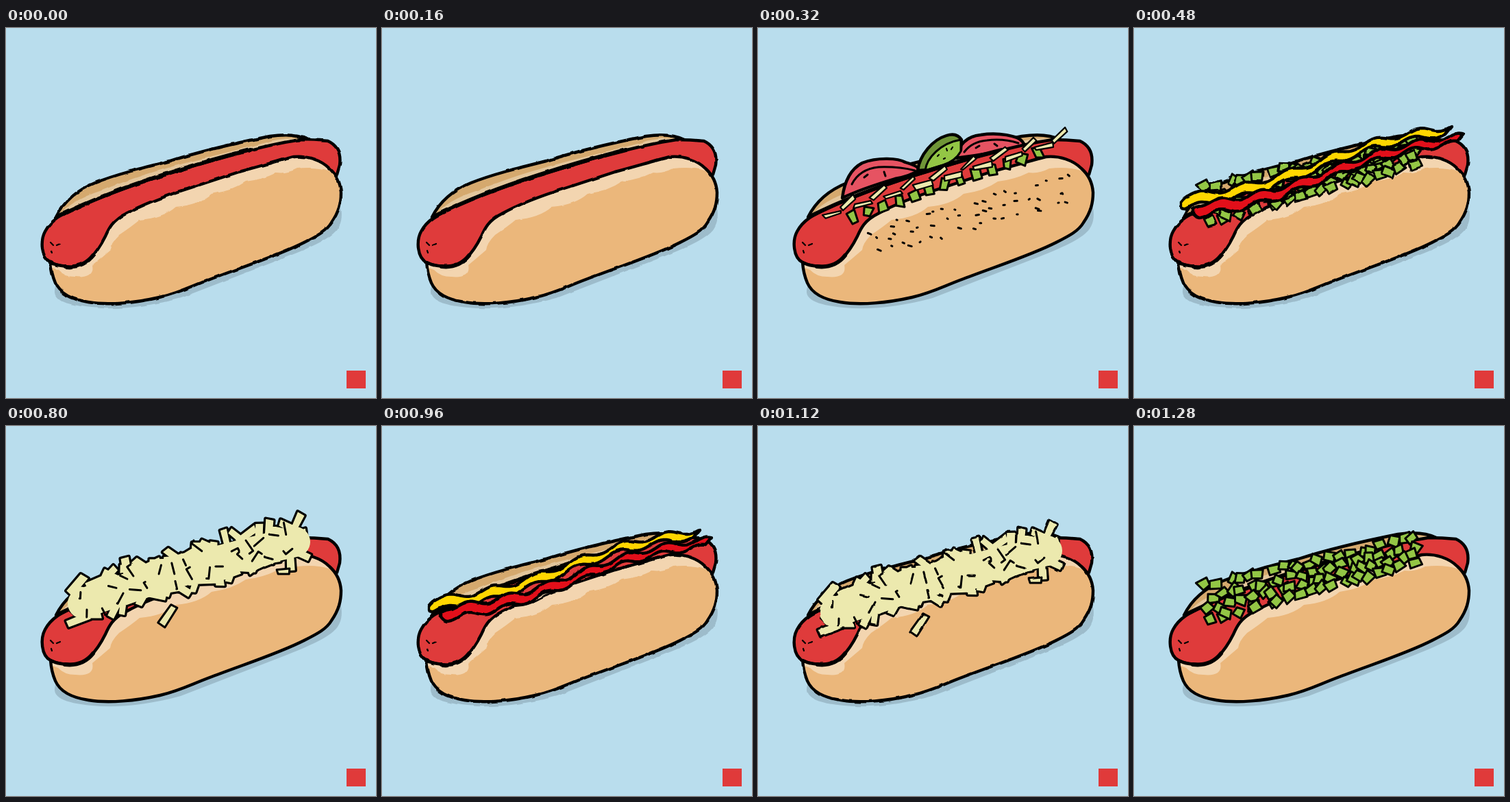
Animation, 540 px wide and 540 px high, one loop 1.44 s. Source, as an HTML page:

```html
<!DOCTYPE html>
<html lang="en">
<head>
<meta charset="utf-8">
<title>Hot dog toppings</title>
<style>
html, body { margin: 0; width: 100%; height: 100%; overflow: hidden; background: #b9dded; }
svg { display: block; width: 100vw; height: 100vh; }
.ink { stroke: #000; stroke-width: 4.4; stroke-linejoin: round; stroke-linecap: round; }
.thin { stroke-width: 3; }
.fine { stroke-width: 2.2; }
.thick { stroke-width: 6; }
.line { fill: none; }
#dog { animation: boil 480ms step-end infinite; }
.on { visibility: hidden; animation: show 1440ms step-end infinite; animation-delay: calc(var(--i) * 160ms - 1440ms); }
@keyframes boil {
  0% { filter: url(#wobble0); }
  33.3333% { filter: url(#wobble1); }
  66.6667%, 100% { filter: none; }
}
@keyframes show {
  0% { visibility: visible; }
  11.1111%, 100% { visibility: hidden; }
}
</style>
</head>
<body>
<svg viewBox="0 0 540 540">
  <defs id="defs">
    <clipPath id="bunClip"><use href="#bun"/></clipPath>
    <path id="bun" d="M65 342C66 356 69 365 72 372C80 390 100 397 120 400C150 405 190 401 225 393C255 386 270 377 300 366C350 347 400 331 435 313C455 303 468 296 475 284C486 268 489 255 489 240C488 225 481 213 472 205C460 193 440 186 420 188C400 193 370 202 340 210L270 233C235 244 200 257 175 271C155 281 150 293 145 304C135 324 120 347 98 348C85 349 72 346 65 342Z"/>
    <path id="back" d="M73 276C85 252 105 236 130 226C160 214 200 204 240 194C290 178 340 167 385 158C405 155 425 155 441 163"/>
  </defs>
  <g id="dog">
    <path fill="#9dbccb" d="M73 376C64 396 85 404 125 408C165 412 210 406 255 394L410 334C450 318 475 306 484 293C491 283 491 270 488 258L300 330Z"/>
    <use href="#back" fill="#d5a96e"/>
    <path fill="#e3c69c" d="M78 275Q92 252 140 237C220 204 300 188 380 167Q405 158 441 163L260 214Z"/>
    <use href="#back" class="ink" fill="none"/>
    <g id="behind"></g>
    <path class="ink" fill="#df3b3b" d="M65 342C51 335 50 310 57 297C66 280 82 272 100 264C140 245 180 231 230 215C300 193 370 172 430 163C445 163 460 164 470 165C485 172 489 185 487 200L483 214L400 250L150 330C130 350 85 352 65 342Z"/>
    <path class="ink line thick" d="M78 274C130 248 180 230 230 214C280 198 320 187 356 178"/>
    <g id="under"></g>
    <use href="#bun" fill="#f3d5b0"/>
    <path id="crust" fill="#ebb77b" clip-path="url(#bunClip)"/>
    <use href="#bun" class="ink" fill="none"/>
    <path class="ink line thick" d="M86 348Q112 351 127 332"/>
    <path class="ink line fine" d="M65 313L69 317M74 317L79 315M66 325L67 328"/>
    <g id="over"></g>
  </g>
  <rect x="497" y="500" width="28" height="26" fill="#e03a3a"/>
</svg>
<script>
const $ = id => document.getElementById(id);
const green = '#93c645', cream = '#ece9ae', tomato = '#e65362';

function random(seed) {
  return () => (seed = (seed * 16807) % 2147483647) / 2147483647;
}

const shape = (d, fill, cls = 'ink') => `<path class="${cls}" fill="${fill}" d="${d}"/>`;
const lines = (d, cls = 'thin') => shape(d, 'none', 'ink line ' + cls);
const poly = points => 'M' + points.map(p => p.map(v => v.toFixed(1))).join('L') + 'Z';
const repeat = (n, draw) => Array.from({ length: n }, (_, i) => draw(i)).join('');
const frame = (i, body) => `<g class="on" style="--i:${i}">${body}</g>`;
const shift = (y, body) => `<g transform="translate(0 ${y})">${body}</g>`;

// Turned, slightly uneven box
function box(x, y, w, h, deg, r) {
  const a = deg * Math.PI / 180, jitter = () => r() * 4 - 2;
  return poly([[-1, -1], [1, -1], [1, 1], [-1, 1]].map(([sx, sy]) => {
    const px = sx * w / 2 + jitter(), py = sy * h / 2 + jitter();
    return [x + px * Math.cos(a) - py * Math.sin(a), y + px * Math.sin(a) + py * Math.cos(a)];
  }));
}

// Jittered grid: u runs along the dog, v across it from -1 to 1
const scatter = (cols, rows, r, draw) => repeat(cols * rows, i => {
  const u = (Math.floor(i / rows) + r()) / cols;
  const v = (i % rows + 0.25 + r() * 0.5) / rows * 2 - 1;
  return draw(u, v);
});

$('defs').insertAdjacentHTML('beforeend', repeat(2, i =>
  `<filter id="wobble${i}" filterUnits="userSpaceOnUse" x="0" y="0" width="540" height="540" color-interpolation-filters="sRGB">
   <feTurbulence type="fractalNoise" baseFrequency=".07" seed="${i + 4}"/>
   <feDisplacementMap in="SourceGraphic" scale="${4 - i}" xChannelSelector="R" yChannelSelector="G"/></filter>`));

// Lower, darker part of the bun with a scalloped upper edge
$('crust').setAttribute('d', 'M492 222Q474 200 425 205q-15 8 -30 6q-20 10 -45 13q-20 14 -50 18q-18 16 -52 19q-18 16 -53 19q-12 10 -30 22q-12 12 -13 22q-14 12 -26 22q4 20 -25 17q-16 0 -25 -10L60 347V420H500Z');

function salad() {
  const slice = (d, marks) => shape(d, tomato) + lines(marks);
  return slice('M123 248C126 225 135 206 152 197C175 188 205 190 215 196Q233 201 236 207Q222 216 200 220Q150 235 123 248Z',
    'M137 228Q148 206 176 203Q205 202 229 208M155 218L160 214M184 210L186 216') +
    slice('M288 190C293 170 305 158 325 156C350 152 380 157 386 166L390 172Q340 184 288 190Z',
      'M301 181Q312 166 334 164Q358 161 380 168M318 175L323 172M345 169L349 172') +
    shape('M233 208C236 185 255 163 275 157Q290 152 297 163L296 178Q288 194 270 200Q250 208 233 208Z', '#6f9537') +
    shape('M244 208C246 190 266 168 296 163L296 180Q288 194 270 200Z', green, 'ink thin') +
    lines('M262 187l2 -2M275 176l1 3M282 177l2 -3M271 191l2 -1', 'fine');
}

function saladTop() {
  const r = random(19);
  const cubes = repeat(13, i => {
    const x = 138 + i * 22.5;
    return shape(box(x, 276 - i * 7.8, 12, 15, r() * 50 - 25, r), green, 'ink thin');
  });
  const strips = repeat(16, i => {
    const steep = i % 2;
    return shape(box(109 + i * 22, 268 - i * 7 + (steep ? -7 : 4), 26, 6, steep ? -42 : -14, r), cream, 'ink fine');
  });
  const seeds = scatter(17, 3, r, (u, v) => {
    const x = 160 + u * 300, y = 286 - u * 80 + (v + 1) * 27;
    return `M${x} ${y}l${1 + r() * 4} ${r() * 3 - 1}`;
  });
  return cubes + strips + lines(seeds);
}

// Each strip is a slab with pale stripes
const bacon = () => [
  ['M60 263Q85 262 95 250L126 235L152 244Q158 262 165 273Q150 283 146 296Q132 315 130 328L114 337Q105 325 108 307Q98 290 85 281Q75 277 65 276Z',
    'M82 258Q92 255 100 255Q125 262 130 280Q136 293 142 303L131 318Q122 298 118 284Q110 270 82 263Z'],
  ['M155 228L218 209Q228 212 235 220L250 236L200 254L178 266Q172 248 155 228Z',
    'M176 224L188 221Q196 238 203 253L191 259Q184 240 176 224Z', 'M208 212L218 209Q229 228 231 243L222 247Q214 228 208 212Z'],
  ['M250 198L315 182Q335 190 343 210L280 233Q272 215 250 208Z', 'M282 191L294 188Q310 203 315 219L303 224Q298 205 282 191Z'],
  ['M340 178L400 166Q412 178 412 191L365 204Q358 190 340 182Z', 'M362 174L371 171Q382 184 386 197L375 200Q372 185 362 174Z'],
  ['M435 161L475 153Q479 165 477 178Q473 190 470 200Q455 194 430 190Q440 176 435 161Z', 'M457 158L466 156Q467 178 463 195L454 190Q460 175 457 158Z']
].map(([slab, ...stripes]) => shape(slab, '#990000') + stripes.map(s => shape(s, '#ecb980', 'ink thin')).join('')).join('');

// Shreds are inked first, then filled again so only the heap's rim stays black
function cheese() {
  const r = random(23);
  const at = (u, v) => [104 + u * 328, 258 - u * 93 - 5 * Math.sin(u * Math.PI) + v * 30];
  const heap = scatter(22, 4, r, (u, v) => box(...at(u, v), 34, 10, r() * 150 - 105, r));
  const body = 'M112 259Q270 203 422 169';
  const marks = scatter(13, 2, r, (u, v) => {
    const [x, y] = at(u, v * 0.9), a = r() * 6.3, len = 9 + r() * 10, hook = r() * 10 - 3;
    const dx = Math.cos(a), dy = Math.sin(a);
    return `M${x} ${y}l${dx * len} ${dy * len}` + (hook > 0 ? `l${-dy * hook} ${dx * hook}` : '');
  });
  return `<path d="${heap}" stroke="#000" stroke-width="6.4" stroke-linejoin="round"/>` +
    shape(heap, cream, '') +
    `<path d="${body}" fill="none" stroke="${cream}" stroke-width="44" stroke-linecap="round"/>` +
    lines(marks) +
    shape(box(237, 276, 32, 9, -55, r), cream, 'ink thin') +
    shape(box(404, 212, 16, 6, 0, r), cream, 'ink thin');
}

// Wavy tapering squirt of sauce from one end to the other
function squirt(x0, y0, x1, y1, phase, period, fill) {
  const top = [], bottom = [];
  for (let x = x0; x <= x1; x += 3) {
    const u = (x - x0) / (x1 - x0);
    const y = y0 + (y1 - y0) * u + 8 * Math.sin(2 * Math.PI * u) + 4 * Math.sin(2 * Math.PI * (x - phase) / period);
    const half = (8.5 - 3 * u) * Math.min(1, Math.sqrt((x - x0) / 9 + 0.15));
    top.push([x + 5 * u, y - half]);
    bottom.unshift([x - 4 * u, y + half]);
  }
  return shape(poly(top.concat(bottom)), fill);
}

const sauces = () =>
  squirt(68, 262, 460, 157, 175, 63, '#ffd600') +
  squirt(86, 274, 477, 170, 197, 57, '#e20f1a') +
  lines('M190 263Q215 262 235 250T270 238M305 221Q325 210 345 208T372 199');

function relish() {
  const r = random(77);
  return scatter(21, 4, r, (u, v) => shape(
    box(102 + u * 312, 259 - u * 78 + v * (33 - 9 * u), 15, 13, r() * 80 - 50, r), green, 'ink thin'));
}

$('behind').innerHTML = frame(2, salad());
$('under').innerHTML = frame(4, bacon());
$('over').innerHTML =
  frame(2, saladTop()) +
  frame(3, relish() + shift(-8, sauces())) +
  frame(5, cheese()) +
  frame(6, sauces()) +
  frame(7, shift(13, cheese())) +
  frame(8, relish());
</script>
</body>
</html>
```
